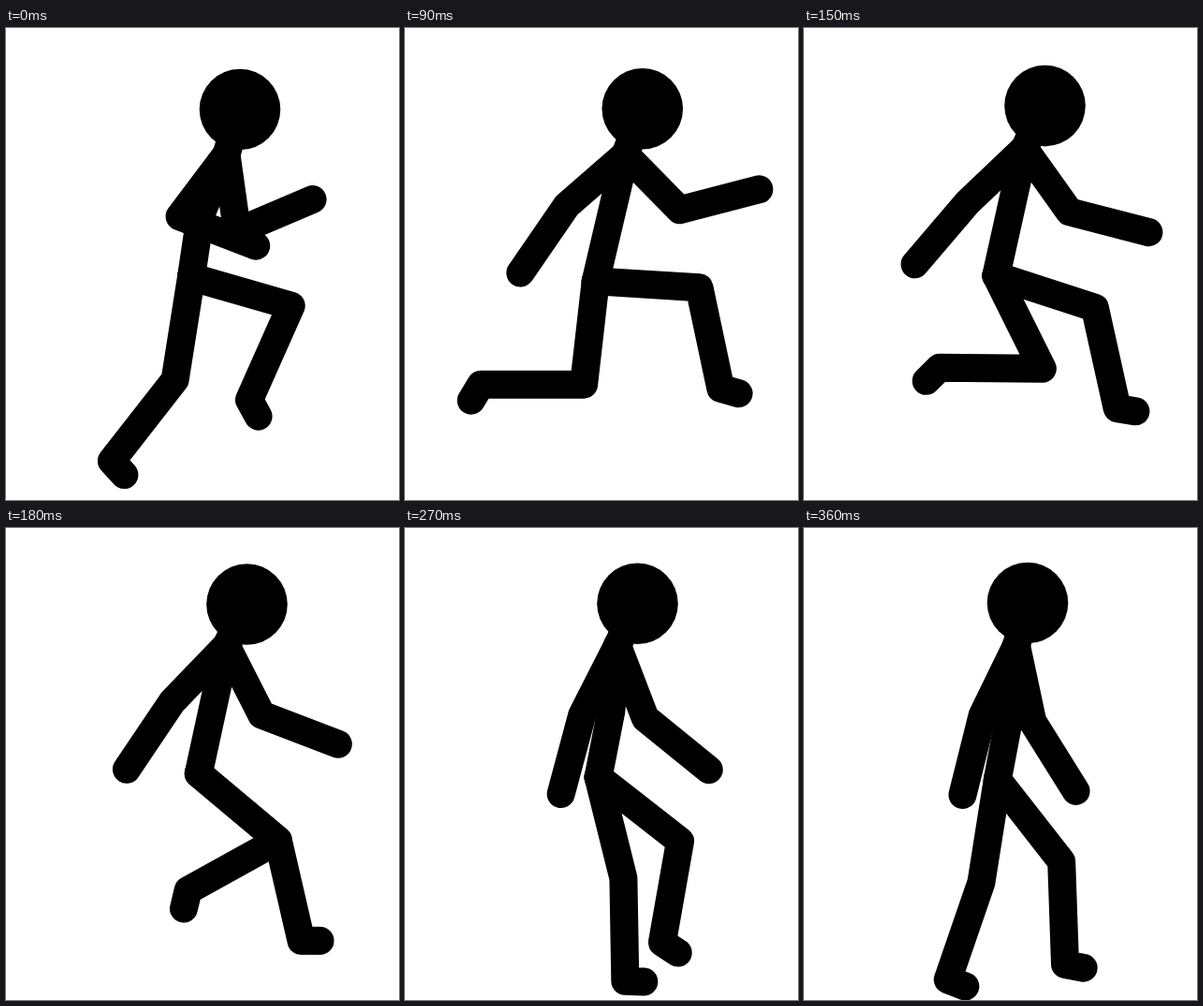
An HTML page with a canvas that plays this animation: 420 by 504 pixels, repeating every 390 ms.

```html
<!DOCTYPE html>
<html lang="en">
<head>
<meta charset="utf-8">
<title>Running figure</title>
<style>
  html, body { margin: 0; width: 100%; height: 100%; overflow: hidden; background: #fff; }
  canvas { display: block; }
</style>
</head>
<body>
<canvas id="stage" width="420" height="504"></canvas>
<script>
const ctx = document.getElementById('stage').getContext('2d');
const STEP_MS = 30;
const STEPS = 13;
const BONES = { upperArm: 83, forearm: 87.5, thigh: 111, shin: 110, foot: 20 };

// Key moments of the stride; each limb bone turns evenly from one to the next.
// Angles are in degrees, clockwise from the right.
const BEATS = [0, 2, 4, 6, 8, 9, 12];
const rearArm = {
  upper: [127, 139, 139, 134, 124, 117, 116],
  lower: [21, 112, 137, 124, 113, 105, 104]
};
const foreArm = {
  upper: [82, 45, 46, 63, 75, 69, 78],
  lower: [-23, -37, 8, 21, 22, 39, 58]
};
const plantingLeg = {
  upper: [16, 11, -4, 40, 50, 76, 99],
  lower: [114, 78, 78, 77, 90, 89, 109]
};
const swingingLeg = {
  upper: [99, 106, 87, 40, 29, 38, 52],
  lower: [128, 150, 210, 151, 140, 100, 88]
};

const mix = (a, b, k) => a + (b - a) * k;
const ramp = (t, from, to) => Math.min(1, Math.max(0, (t - from) / (to - from)));

function angleAt(keys, t) {
  const i = Math.max(1, BEATS.findIndex(beat => beat >= t));
  return mix(keys[i - 1], keys[i], ramp(t, BEATS[i - 1], BEATS[i]));
}

function extend([x, y], degrees, length) {
  const a = degrees * Math.PI / 180;
  return [x + Math.cos(a) * length, y + Math.sin(a) * length];
}

function arm(shoulder, { upper, lower }, t) {
  const elbow = extend(shoulder, angleAt(upper, t), BONES.upperArm);
  return [shoulder, elbow, extend(elbow, angleAt(lower, t), BONES.forearm)];
}

function leg(hip, { upper, lower }, t) {
  const thigh = angleAt(upper, t);
  const shin = angleAt(lower, t);
  const ankleFlex = 92 - 0.4 * (shin - thigh);  // the foot points as the knee bends
  const knee = extend(hip, thigh, BONES.thigh);
  const ankle = extend(knee, shin, BONES.shin);
  return [hip, knee, ankle, extend(ankle, shin - ankleFlex, BONES.foot)];
}

function bodyAt(t) {
  const rise = ramp(t, 3, 6);
  const pullBack = ramp(t, 8, 9);
  const bounce = 6 * Math.exp(-t / 18) * Math.sin(0.7 * t);
  const hip = [207 - 9 * Math.exp(-t / 3), 266 + bounce];
  const shoulder = [235.5 - 8.5 * pullBack, 135 - 9.5 * rise];
  const head = [
    250 + 7.5 * ramp(t, 2, 4) - 9 * pullBack - 9.5 * ramp(t, 9, 12),
    87 - 4 * rise - t / 4
  ];
  const bow = 9 * ramp(t, 0, 2) - 9 + 3.5 * pullBack;
  const waist = [mix(shoulder[0], hip[0], 0.5) + bow, mix(shoulder[1], hip[1], 0.5)];
  return { head, shoulder, waist, hip };
}

function strokePath(points) {
  ctx.beginPath();
  points.forEach(p => ctx.lineTo(...p));
  ctx.stroke();
}

function draw(t) {
  const { head, shoulder, waist, hip } = bodyAt(t);
  ctx.fillStyle = '#fff';
  ctx.fillRect(0, 0, 420, 504);
  ctx.fillStyle = ctx.strokeStyle = '#000';
  ctx.lineWidth = 30;
  ctx.lineCap = ctx.lineJoin = 'round';
  [
    [head, shoulder, waist, hip],
    arm(shoulder, rearArm, t),
    arm(shoulder, foreArm, t),
    leg(hip, plantingLeg, t),
    leg(hip, swingingLeg, t)
  ].forEach(strokePath);
  ctx.beginPath();
  ctx.arc(...head, 43.3, 0, Math.PI * 2);
  ctx.fill();
}

function tick() {
  draw(Math.floor(performance.now() / STEP_MS) % STEPS);
  requestAnimationFrame(tick);
}
tick();
</script>
</body>
</html>
```
